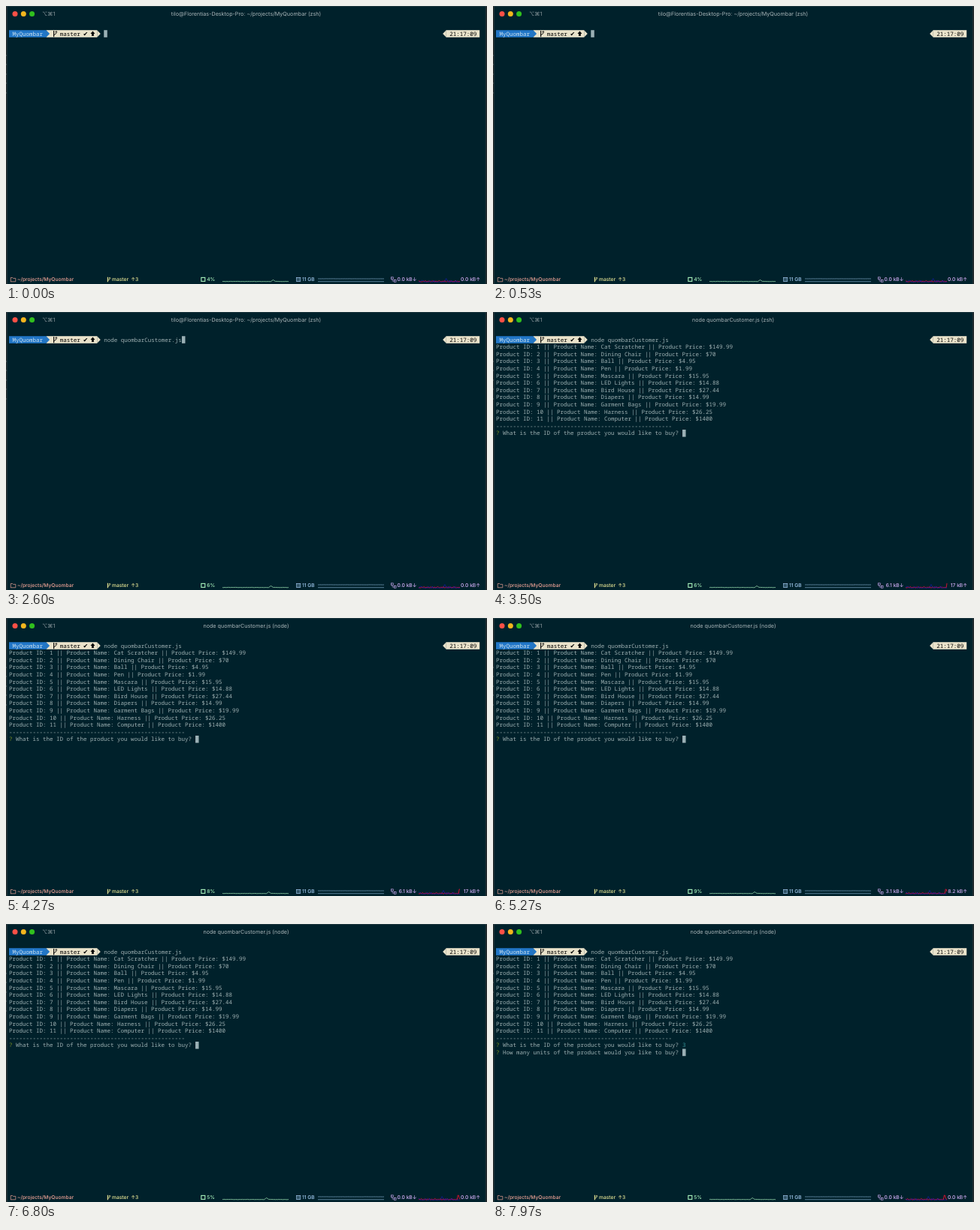
An HTML page with a canvas that plays this animation: 640x371 px, repeating every 8 s.

```html
<!DOCTYPE html>
<html lang="en">
<head>
<meta charset="utf-8">
<title>Terminal shop</title>
<style>
  html, body { margin: 0; width: 100%; height: 100%; overflow: hidden; background: #00212b; }
  canvas { display: block; width: 640px; height: 371px; }
</style>
</head>
<body>
<canvas id="stage"></canvas>
<script>
const W = 640, H = 371, LOOP = 8000;
const canvas = document.getElementById('stage');
const ctx = canvas.getContext('2d');
const dpr = window.devicePixelRatio || 1;
canvas.width = W * dpr;
canvas.height = H * dpr;

const MONO = '7.515px "Noto Sans Mono", "DejaVu Sans Mono", monospace';
const SYMBOL = '8px "DejaVu Sans", sans-serif';
const TITLE = '7.2px Inter, "DejaVu Sans", sans-serif';
const STATUS = '500 6.7px Inter, "DejaVu Sans", sans-serif';
const BG = '#00212b', FG = '#9eb0b2', CREAM = '#eae3cb', BLUE = '#2176c7', INK = '#000000';
const CELL = 4.509, ROW = 9.6, LEFT = 4, TOP = 32.2;

const COMMAND = 'node quombarCustomer.js';
const HOST_TITLE = 'tilo@Florentias-Desktop-Pro: ~/projects/MyQuombar (zsh)';
const PRODUCTS = [
  ['Cat Scratcher', '149.99'], ['Dining Chair', '70'], ['Ball', '4.95'], ['Pen', '1.99'],
  ['Mascara', '15.95'], ['LED Lights', '14.88'], ['Bird House', '27.44'], ['Diapers', '14.99'],
  ['Garment Bags', '19.99'], ['Harness', '26.25'], ['Computer', '1400']
];

// Moments in the session, in ms
const AT = { clear: 900, recall: 1700, enter: 2950, list: 3200, job: 4150, digit: 7200, answer: 7680 };

// One reading per second
const CPU = [4, 10, 6, 6, 8, 9, 5, 5];
const DOWN = ['0.0', '1.0', '0.0', '6.1', '6.1', '3.1', '0.0', '0.0'];
const UP = ['0.0', '0.0', '0.0', '17', '17', '8.2', '0.0', '0.0'];

const colX = c => LEFT + c * CELL;
const rowY = r => TOP + r * ROW;
const noise = n => {
  const v = Math.sin(n * 127.1 + 11.7) * 43758.5453;
  return v - Math.floor(v);
};

function text(str, x, y, font, color, align = 'left') {
  ctx.font = font;
  ctx.fillStyle = color;
  ctx.textAlign = align;
  ctx.fillText(str, x, y);
}

function mono(str, col, row, color = FG) {
  text(str, colX(col), rowY(row) + 7.4, MONO, color);
}

function rect(x, y, w, h, color) {
  ctx.fillStyle = color;
  ctx.fillRect(x, y, w, h);
}

function poly(points, color) {
  ctx.beginPath();
  points.forEach(([x, y]) => ctx.lineTo(x, y));
  ctx.fillStyle = color;
  ctx.fill();
}

function line(points, color, width = 0.8) {
  ctx.beginPath();
  points.forEach(([x, y]) => ctx.lineTo(x, y));
  ctx.strokeStyle = color;
  ctx.lineWidth = width;
  ctx.stroke();
}

function box(x, y, w, h, color, width = 0.8) {
  ctx.strokeStyle = color;
  ctx.lineWidth = width;
  ctx.strokeRect(x, y, w, h);
}

function dot(x, y, r, color) {
  ctx.beginPath();
  ctx.arc(x, y, r, 0, Math.PI * 2);
  ctx.fillStyle = color;
  ctx.fill();
}

function branch(x, y, color, size = 1) {
  const at = (dx, dy) => [x + dx * size, y + dy * size];
  line([at(0.8, -3.3), at(0.8, 3.3)], color, 1.1);
  line([at(0.8, 1.5), at(3.4, -0.4), at(3.4, -2.6)], color, 0.9);
  line([at(2.2, -1.5), at(3.4, -2.8), at(4.5, -1.5)], color, 0.7);
}

function upArrow(x, y, color) {
  poly([[x, y - 3.4], [x + 3, y], [x + 1.4, y], [x + 1.4, y + 3],
        [x - 1.4, y + 3], [x - 1.4, y], [x - 3, y]], color);
}

function cursor(col, row) {
  rect(colX(col), rowY(row), CELL, ROW, '#9bb0b5');
}

function drawWindow(t) {
  rect(0, 0, W, H, BG);
  rect(0, 0, 1.3, H, '#22292c');
  rect(1.3, 0, 0.6, H, '#2c3d42');
  rect(637.8, 0, 0.6, H, '#2c3d42');
  rect(638.4, 0, 1.6, H, '#22292c');
  rect(0, 0, W, 0.6, '#34474d');
  [66, 78, 91, 103, 116].forEach(y => rect(0, y - 1, 0.9, 2, '#454f53'));

  dot(12, 10.5, 3.5, '#fe5046');
  dot(23.3, 10.5, 3.5, '#f4b51e');
  dot(34.6, 10.5, 3.5, '#30c01e');
  text('⌥⌘1', 48, 13, TITLE, '#8f9ca0');

  const title = t < AT.enter ? HOST_TITLE : `${COMMAND} (${t < AT.job ? 'zsh' : 'node'})`;
  text(title, 319.5, 13, TITLE, '#abb6b9', 'center');
}

function drawPrompt(t) {
  const y = TOP, mid = TOP + ROW / 2, end = TOP + ROW;
  rect(colX(11), y, colX(26) - colX(11), ROW, CREAM);
  poly([[colX(26), y], [colX(27), mid], [colX(26), end]], CREAM);
  rect(LEFT, y, 11 * CELL, ROW, BLUE);
  poly([[colX(11) - 0.1, y], [colX(12), mid], [colX(11) - 0.1, end]], BLUE);
  mono('MyQuombar', 1, 0, '#c9dfee');
  branch(colX(13), mid, INK, 1.25);
  mono('master', 15, 0, INK);
  text('✔', colX(22) - 0.6, y + 7.7, SYMBOL, INK);
  upArrow(colX(24) + 3.2, mid, INK);

  rect(colX(129), y, 630.2 - colX(129), ROW, CREAM);
  poly([[colX(129) + 0.1, y], [colX(128), mid], [colX(129) + 0.1, end]], CREAM);
  mono('21:17:09', 130, 0, INK);

  const typed = t < AT.clear ? '' : t < AT.recall ? 'clear' : COMMAND;
  mono(typed, 28, 0);
  if (t < AT.enter) cursor(28 + typed.length, 0);
  else if (t < AT.list) cursor(0, 1);
}

function ask(question, row) {
  mono('?', 0, row, '#7d9220');
  mono(question, 2, row);
}

function drawOutput(t) {
  if (t < AT.list) return;
  PRODUCTS.forEach(([name, price], i) =>
    mono(`Product ID: ${i + 1} || Product Name: ${name} || Product Price: $${price}`, 0, i + 1));
  mono('-'.repeat(52), 0, 12);
  ask('What is the ID of the product you would like to buy?', 13);
  const answered = t >= AT.answer;
  if (t >= AT.digit) mono('3', 55, 13, answered ? '#35979c' : FG);
  if (answered) {
    ask('How many units of the product would you like to buy?', 14);
    cursor(55, 14);
  } else {
    cursor(t < AT.digit ? 55 : 56, 13);
  }
}

// Scrolling history of 61 samples; height depends on the sample number
function spark(x, w, base, sec, height, color, width) {
  const pts = [];
  for (let i = 0; i <= 60; i++) pts.push([x + i * w / 60, base - height(i + sec)]);
  line(pts, color, width);
}

function drawStatus(t) {
  const sec = Math.min(7, Math.floor(t / 1000));
  const y = 367.3;
  const salmon = '#f0a497', yellow = '#ecea98', mint = '#a9f2bd', sky = '#a5cdf3', violet = '#d3aef5';
  const skyLine = '#7fa6c4';

  line([[6.3, 367.8], [6.3, 362.5], [8.7, 362.5], [9.5, 363.4], [12.8, 363.4], [12.8, 367.8], [6, 367.8]], salmon, 0.7);
  text('~/projects/MyQuombar', 15, y, STATUS, salmon);

  branch(134.6, 365, yellow);
  text('master', 141, y, STATUS, yellow);
  text('↑3', 166.3, y, STATUS, yellow);

  box(259.8, 362.4, 5, 5, mint, 1.1);
  text(CPU[sec] + '%', 267.2, y, STATUS, mint);
  const cpuHeight = n => Math.abs(n - 46) < 2 ? 2.5 - Math.abs(n - 46) : 0.2 + noise(n) * 0.4;
  spark(288, 88, 368, sec, cpuHeight, mint, 0.7);

  box(386.6, 362.6, 5.2, 4.8, sky, 0.7);
  line([[388.2, 362.4], [388.2, 367.6]], sky, 0.6);
  line([[390.2, 362.4], [390.2, 367.6]], sky, 0.6);
  text('11 GB', 394, y, STATUS, sky);
  spark(415, 88, 364.1, sec, n => noise(n) * 0.15, skyLine, 0.7);
  line([[415, 367.7], [503, 367.7]], skyLine, 0.7);

  box(512.6, 361.9, 2.6, 2.6, violet, 0.7);
  box(516.4, 365.6, 2.6, 2.6, violet, 0.7);
  line([[514, 365], [514, 367], [516, 367]], violet, 0.6);
  text(DOWN[sec] + ' kB↓', 546.5, y, STATUS, violet, 'right');
  text(UP[sec] + ' kB↑', 631, y, STATUS, violet, 'right');

  const upHeight = n => n >= 63 && n <= 65 ? (n < 65 ? 6 : 3) : noise(n + 200) ** 2 * 1.5;
  const downHeight = n => Math.abs(n - 40) < 2 ? 4 - Math.abs(n - 40) * 1.5 : noise(n + 500) ** 4 * 2;
  spark(549, 55, 368, sec, upHeight, '#cf1230', 1);
  spark(549, 55, 367.6, sec, n => downHeight(n) > 1 ? downHeight(n) : -0.6, 'rgba(30, 24, 225, 0.6)', 0.8);
}

function draw(t) {
  ctx.setTransform(dpr, 0, 0, dpr, 0, 0);
  ctx.textBaseline = 'alphabetic';
  ctx.textRendering = 'geometricPrecision';
  drawWindow(t);
  drawPrompt(t);
  drawOutput(t);
  drawStatus(t);
}

const start = performance.now();
function tick() {
  draw((performance.now() - start) % LOOP);
  requestAnimationFrame(tick);
}
tick();
</script>
</body>
</html>
```
